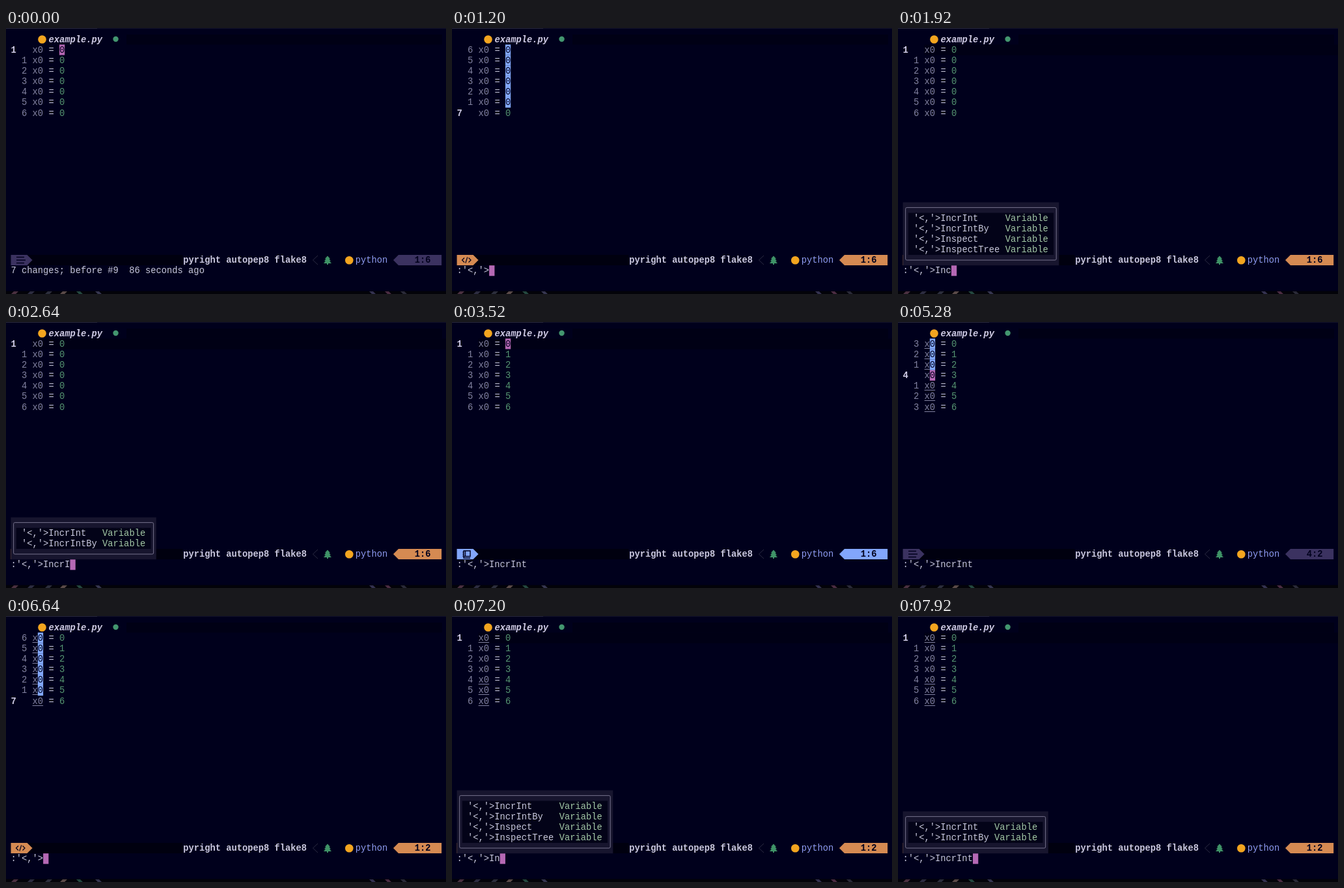
Animation of 676x408 px, one loop 8000 ms. Source, as an HTML page:

```html
<!DOCTYPE html>
<html lang="en">
<head>
<meta charset="utf-8">
<title>Column increment</title>
<style>
html, body { margin: 0; width: 100%; height: 100%; overflow: hidden; background: #00001c; }
svg { display: block; width: 676px; height: 408px; }
text { font: 13.78px "Liberation Mono", "DejaVu Sans Mono", monospace; white-space: pre; }
.b { font-weight: 700; }
.i { font-style: italic; }
</style>
</head>
<body>
<svg id="stage" viewBox="0 0 676 408"></svg>
<script>
const stage = document.getElementById('stage');
const LOOP = 8000, LEFT = 7.5, CELL = 8.27, TOP = 9.3, ROW = 16.13, LINES = 7;
const C = {
  bg: '#00001c', dark: '#00000f', shade: '#000015', fg: '#c9c9dc', dim: '#8282a0',
  green: '#559571', cursor: '#b568b4', select: '#82a8fb', visual: '#3b3260',
  command: '#d58a52', normal: '#82a6fc', python: '#f3a51f', type: '#a3c8a6'
};
const COMMANDS = ['IncrInt', 'IncrIntBy', 'Inspect', 'InspectTree'];
const WORD = 'IncrInt';

// Moments at which each key lands.
const DOWN_1 = [160, 320, 480, 560, 720, 880];
const LEFT_KEYS = [3920, 4080, 4240, 4400];
const DOWN_2 = [4960, 5120, 5280, 5440, 5760, 6000];
const TYPE_1 = [1680, 1760, 1920, 2080, 2480, 2800, 2960];
const TYPE_2 = [6960, 7120, 7280, 7360, 7520, 7680, 7760];

const px = col => LEFT + col * CELL;
const py = row => TOP + row * ROW;
const count = (times, t) => times.filter(k => t >= k).length;
const esc = s => s.replace(/&/g, '&amp;').replace(/</g, '&lt;').replace(/>/g, '&gt;');
const rect = (x, y, w, h, fill, more = '') =>
  `<rect x="${x}" y="${y}" width="${w}" height="${h}" fill="${fill}" ${more}/>`;
const path = (d, fill, more = '') => `<path d="${d}" fill="${fill}" ${more}/>`;
const dot = (x, y, r, fill) => `<circle cx="${x}" cy="${y}" r="${r}" fill="${fill}"/>`;
const line = (d, color, w = 1) => path(d, 'none', `stroke="${color}" stroke-width="${w}"`);
const block = (col, row, fill) => rect(px(col), py(row), CELL, ROW, fill);
const text = (col, row, s, fill = C.fg, cls = '') =>
  `<text x="${px(col)}" y="${py(row) + 12.3}" fill="${fill}" class="${cls}">${esc(s)}</text>`;

function stateAt(t) {
  const second = t >= 3920;
  const colon = second ? 6400 : 960;
  const typed = count(second ? TYPE_2 : TYPE_1, t);
  const done = t >= 3280;
  const s = { done, typed, col: 6 - count(LEFT_KEYS, t), row: 0, underline: t >= 4640 };
  if (t >= colon && (second || !done)) s.mode = 'command';
  else if (t < 960 || t >= 4800) s.mode = 'visual';
  else s.mode = 'normal';
  s.preview = s.mode === 'command' && typed > 0;
  if (!s.preview && s.mode !== 'normal') s.row = count(second ? DOWN_2 : DOWN_1, t);
  return s;
}

function header() {
  return rect(0, 0, 676, 1, '#14142a') + rect(0, 0, 140, 1, '#2c2c3c') +
    rect(185, 10, 485, 15.4, C.shade) +
    dot(55.5, 17.5, 6.3, C.python) +
    text(7, 0, 'example.py', '#d0cce4', 'b i') +
    dot(168.6, 17, 4.2, '#43966f');
}

function buffer(s) {
  const lit = s.preview || s.mode === 'normal';
  let out = lit ? rect(px(4), py(s.row + 1), 676 - px(4), ROW, C.shade) : '';
  for (let i = 0; i < LINES; i++) {
    const row = i + 1, here = i === s.row;
    out += here ? text(0, row, String(row), '#cfcbe4', 'b')
                : text(2, row, String(Math.abs(i - s.row)), C.dim);
    const chars = ['x', '0', ' ', '=', ' ', String(s.done ? i : 0)];
    const cursor = here && s.mode !== 'command';
    const selected = !s.preview && s.mode !== 'normal' && i < s.row;
    chars.forEach((ch, k) => {
      let color = k < 2 ? C.dim : k === 3 ? C.fg : C.green;
      if (k === s.col - 1 && (cursor || selected)) {
        out += block(4 + k, row, cursor ? C.cursor : C.select);
        color = C.bg;
      }
      if (ch !== ' ') out += text(4 + k, row, ch, color);
    });
    const marked = s.preview ? i < 1 || i > 3 : s.mode !== 'visual' || !here;
    if (s.underline && marked)
      out += rect(px(4), Math.round(py(row) + 14.4), (selected ? 1 : 2) * CELL, 1, C.dim);
  }
  return out;
}

function modeIcon(mode) {
  if (mode === 'visual')
    return line('M16 351.5H28M16 356H30M16 360.5H28', C.bg, 1.7);
  if (mode === 'command')
    return line('M19 352.5L15.5 356L19 359.5M25.5 352.5L29 356L25.5 359.5M23.7 351.5L20.8 360.5', C.bg, 1.2);
  return line('M18 351H28V359.5H18ZM18 359.5V362H28M20.5 351V359.5', C.bg, 1.4) +
    line('M16 353H19M16 356H19M16 359H19', C.bg, 1.1);
}

function status(s) {
  const color = C[s.mode], y = Math.round(py(21)), mid = y + 8, end = y + 16;
  return rect(px(0), y, 264, 16, C.dark) +
    path(`M${px(0)} ${y}H32.5L40.6 ${mid}L32.5 ${end}H${px(0)}Z`, color) +
    modeIcon(s.mode) +
    text(32, 21, 'pyright autopep8 flake8', '#cbc9de', 'b') +
    line(`M479 ${y + 1}L471.5 ${mid}L479 ${end - 1}`, '#2b2b42') +
    path('M494 349.5L498 354H496.5L499 357.5H497L500 361H495V363H493V361H488L491 357.5H489L491.5 354H490Z', '#3f9367') +
    dot(527.3, 356.3, 6.3, C.python) +
    text(64, 21, 'python', '#8f9cf0') +
    path(`M669.2 ${y}H603L595 ${mid}L603 ${end}H669.2Z`, color) +
    text(75, 21, `${s.mode === 'command' ? 1 : s.row + 1}:${s.col}`, C.bg, 'b');
}

function matches(query) {
  const fuzzy = new RegExp([...query].join('.*'));
  return COMMANDS.filter(name => fuzzy.test(name));
}

// The box rests on the command line and covers the left end of the status bar.
function popup(query) {
  const names = matches(query);
  const width = Math.max(...names.map(n => n.length)) + 18;
  const top = 20 - names.length, h = (names.length + 2) * ROW;
  const w = width * CELL;
  let out = rect(px(0), py(top), w, h, '#17152e') +
    rect(px(.5), py(top) + 8, w - CELL, h - ROW, 'none', 'rx="2" stroke="#77738e"') +
    rect(px(1), py(top + 1), w - 2 * CELL, h - 2 * ROW, '#030318');
  names.forEach((name, i) => {
    out += text(2, top + 1 + i, "'<,'>" + name) +
      text(width - 10, top + 1 + i, 'Variable', C.type);
  });
  return out;
}

function commandLine(s, t) {
  if (t < 960) return text(0, 22, '7 changes; before #9  86 seconds ago');
  const typing = s.mode === 'command';
  const typed = typing ? WORD.slice(0, s.typed) : WORD;
  const input = ":'<,'>" + typed;
  return text(0, 22, input) +
    (typing ? block(input.length, 22, C.cursor) : '') +
    (typing && typed.length > 1 ? popup(typed) : '');
}

function footer() {
  const chips = [[8, '#4a3040'], [33, '#2c2c40'], [60, '#2c2e3c'], [83, '#5a4a48'],
    [108, '#24483f', 1], [137, '#363650', 1], [558, '#343250', 1], [582, '#4b2c42', 1], [606, '#2a2a38', 1]];
  return rect(0, 403.5, 676, 4.5, '#030309') + chips.map(([x, color, back]) =>
    path(back ? `M${x} 404H${x + 6}L${x + 10} 408H${x + 4}Z`
              : `M${x} 408L${x + 4} 404H${x + 11}L${x + 7} 408Z`, color)).join('');
}

function update(t) {
  const s = stateAt(t);
  return rect(0, 0, 676, 408, C.bg) + header() + buffer(s) + status(s) +
    commandLine(s, t) + footer();
}

let shown = '', start = performance.now();
function tick(now) {
  const next = update(Math.max(0, now - start) % LOOP);
  if (next !== shown) stage.innerHTML = shown = next;
  requestAnimationFrame(tick);
}
tick(start);
</script>
</body>
</html>
```
